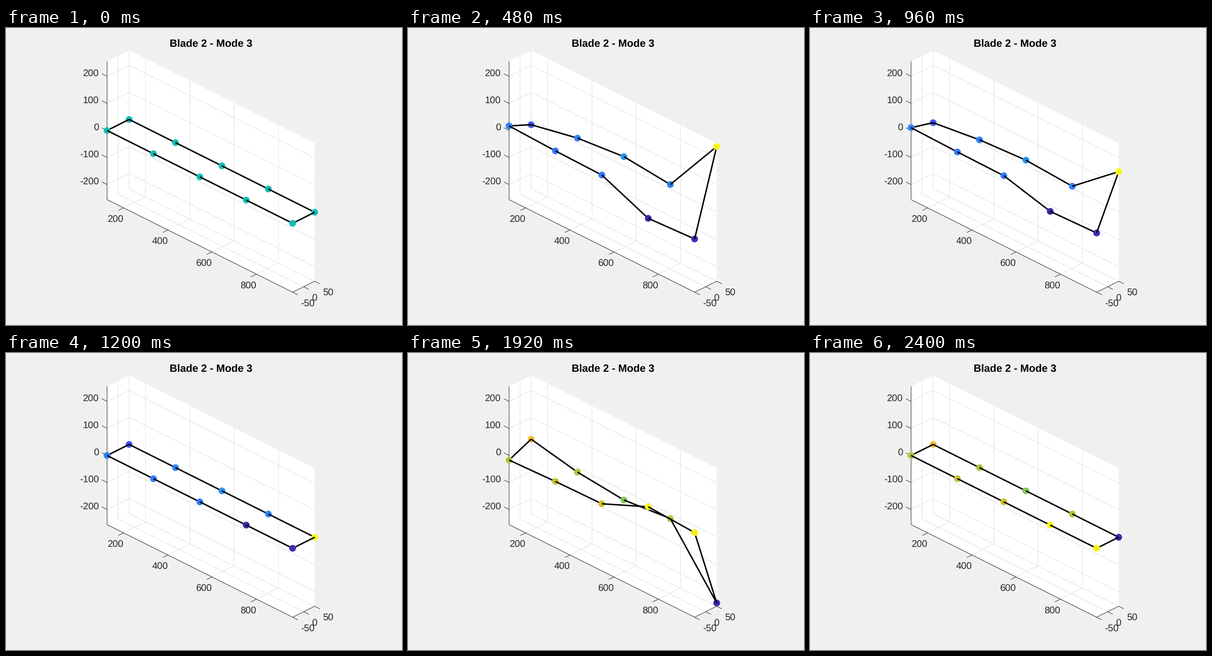
Recreate the animation shown at these times as a matplotlib script. Size 864 by 648 pixels, loop 2520 ms.

```python
import numpy as np
import matplotlib as mpl
import matplotlib.pyplot as plt
from matplotlib.animation import FuncAnimation
from matplotlib.colors import LinearSegmentedColormap
from matplotlib.patches import Circle, Polygon

mpl.rcParams["font.family"] = "Liberation Sans"
mpl.rcParams["text.hinting"] = "none"

W, H = 864, 648
STEPS = 20
CENTRE = np.array([447.02, 312.8])
SCALE = 0.482                      # pixels per unit along x and y
X0, X1, YB, ZB = 125, 965, 50, 255.4
XM = (X0 + X1) / 2
INK, GRID = "#262626", "#dfdfdf"
X_TICKS, Y_TICKS, Z_TICKS = range(200, 801, 200), (-50, 0, 50), range(-200, 201, 100)

# indigo, blue, teal, green, orange, yellow
cmap = LinearSegmentedColormap.from_list("blade", [
    (0, "#3e26a8"), (.13, "#484df0"), (.25, "#327cfc"), (.38, "#20a5e2"),
    (.5, "#12beb9"), (.65, "#6bcd69"), (.76, "#d1bf27"), (.85, "#fbbc3d"), (1, "#f9fb15")])


def project(x, y, z):
    """Orthographic view at azimuth 45 and elevation 30, in pixels."""
    u = SCALE * (x - XM + y)
    v = SCALE * ((x - XM - y) / 2 - np.sqrt(1.5) * z)
    return np.stack([CENTRE[0] + u, CENTRE[1] + v], axis=-1)


def nearness(x, y, z):
    return np.sqrt(3 / 8) * (x - y) + z / 2


fig = plt.figure(figsize=(W / 72, H / 72), dpi=72, facecolor="#f0f0f0")
ax = fig.add_axes((0, 0, 1, 1))
ax.set(xlim=(0, W), ylim=(H, 0))
ax.axis("off")


def path(points, color, z):
    # corners sit on pixel centres
    pts = np.floor([project(*p) for p in points]) + 0.5
    ax.plot(*pts.T, color=color, lw=1.04, zorder=z, solid_capstyle="butt", snap=False)


def tick(point, dx, dy, label, tx, ty, ha):
    x, y = np.floor(project(*point)) + 0.5
    ax.plot([x, x + dx], [y, y + dy], color=INK, lw=1.04, zorder=2)
    ax.text(x + tx, y + ty, str(label), size=20.83, color=INK, ha=ha, va="baseline")


def draw_box():
    panes = (
        [(X0, YB, -ZB), (X1, YB, -ZB), (X1, YB, ZB), (X0, YB, ZB)],
        [(X0, -YB, -ZB), (X0, YB, -ZB), (X0, YB, ZB), (X0, -YB, ZB)],
        [(X0, -YB, -ZB), (X1, -YB, -ZB), (X1, YB, -ZB), (X0, YB, -ZB)],
    )
    for pane in panes:
        ax.add_patch(Polygon([project(*p) for p in pane], fc="white", ec="none", zorder=0))

    for x in X_TICKS:
        path([(x, -YB, -ZB), (x, YB, -ZB), (x, YB, ZB)], GRID, 1)
        tick((x, -YB, -ZB), -10.8, 5.4, x, 0, 30.4, "right")
    for y in Y_TICKS:
        path([(X1, y, -ZB), (X0, y, -ZB), (X0, y, ZB)], GRID, 1)
        tick((X1, y, -ZB), 10.8, 5.4, y, 17.2, 30.4, "left")
    for z in Z_TICKS:
        path([(X0, -YB, z), (X0, YB, z), (X1, YB, z)], GRID, 1)
        tick((X0, -YB, z), -10.8, -5.4, z, -17.8, -0.6, "right")

    path([(X0, -YB, ZB), (X0, -YB, -ZB)], INK, 2)
    path([(X0, -YB, -ZB), (X1, -YB, -ZB), (X1, YB, -ZB)], INK, 2)
    ax.text(CENTRE[0], 41, "Blade 2 - Mode 3", size=22.9, weight="bold",
            color="black", ha="center", va="baseline")


draw_box()

# Outline of the blade: along the front edge, then back along the rear edge
span = np.linspace(X0, X1, 5)
node_x = np.concatenate([span, span[::-1]])
node_y = np.repeat([-YB, YB], 5)
shape = np.array([17.8, 10.8, 7.3, -71, -61, ZB, 17.6, 35.6, 17.6, -20.4])
N = len(shape)

edges = [ax.plot([], [], color="black", lw=3.125, solid_capstyle="butt")[0] for _ in range(N)]
dots = [ax.add_patch(Circle((0, 0), 7.37, lw=0)) for _ in range(N)]
pins = [ax.add_patch(Circle((0, 0), 0.5, lw=0, fc="black")) for _ in range(N)]


def update(k):
    z = shape * np.sin(2 * np.pi * k / STEPS)
    spread = np.ptp(z)
    level = (z - z.min()) / spread if spread else np.full(N, 0.5)
    pts = project(node_x, node_y, z)
    rank = 10 + np.argsort(np.argsort(nearness(node_x, node_y, z)))

    for i, color in enumerate(cmap(level)):
        dots[i].set(center=pts[i], facecolor=color, zorder=rank[i])
        pins[i].set(center=pts[i], zorder=rank[i] + 0.2)
        # an edge lies under the dot at its nearer end and over the other
        j = (i + 1) % N
        edges[i].set_data(*pts[[i, j]].T)
        edges[i].set_zorder(max(rank[i], rank[j]) - 0.5)
    return edges + dots + pins


anim = FuncAnimation(fig, update, frames=STEPS + 1, interval=120, repeat=True, repeat_delay=0)
plt.show()
```
